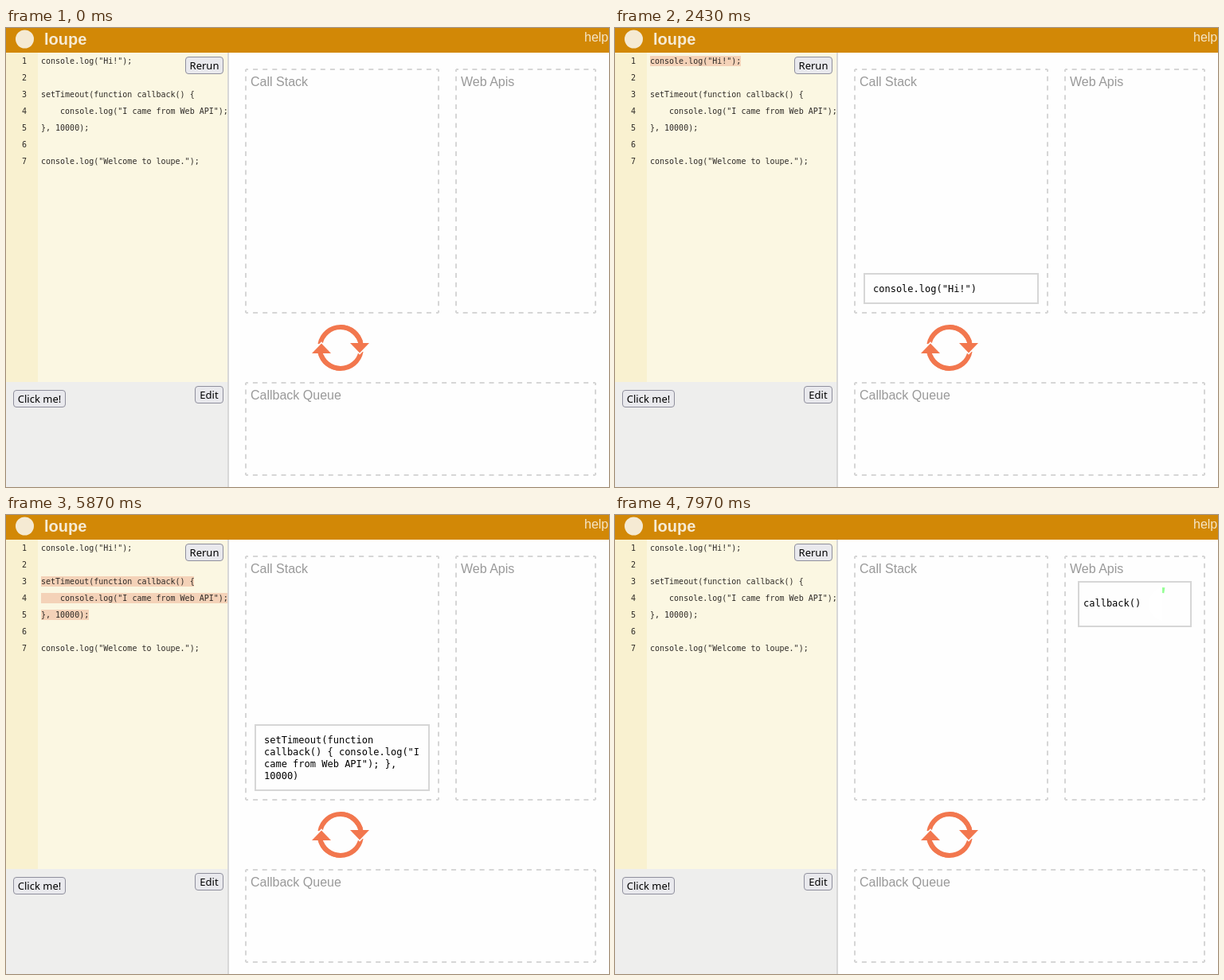
Animation, 757 px wide and 577 px high, one loop 8 s. Source, as an HTML page:

```html
<!DOCTYPE html>
<html lang="en">
<head>
<meta charset="utf-8">
<title>loupe</title>
<style>
  html, body { margin: 0; width: 100%; height: 100%; overflow: hidden; background: #fefefe; }
  svg { display: block; width: 757px; height: 577px; }
  text { white-space: pre; }
  .ui { font: 16px "Liberation Sans", Arial, sans-serif; }
  .label { fill: #999; }
  .code { font: 10px "DejaVu Sans Mono", monospace; fill: #2e2a26; }
  .call { font: 12px "DejaVu Sans Mono", monospace; fill: #000; }
  .button rect { fill: #e9e9ed; stroke: #8f8f9d; }
  .button text { font: 13px "Noto Sans", "Open Sans", sans-serif; text-anchor: middle; }
  .mark { fill: #f4d2b8; }
  .frame { fill: #fefefe; stroke: #d6d6d6; stroke-width: 2; }
  .dash { fill: none; stroke: #d6d6d6; stroke-width: 2; }
  .ring { fill: none; stroke: #f2774e; stroke-width: 6; }
  .arrow { fill: #f2774e; stroke: #fefefe; stroke-width: 3; paint-order: stroke; }
</style>
</head>
<body>
<svg id="stage" viewBox="0 0 757 577"></svg>
<script>
const LOOP = 8000;
const stage = document.getElementById('stage');

function add(parent, tag, attrs = {}, content) {
  const node = document.createElementNS('http://www.w3.org/2000/svg', tag);
  for (const key in attrs) node.setAttribute(key, attrs[key]);
  if (content !== undefined) node.textContent = content;
  parent.appendChild(node);
  return node;
}
const group = (parent = stage, attrs) => add(parent, 'g', attrs);
const rect = (parent, x, y, width, height, attrs) =>
  add(parent, 'rect', { x, y, width, height, ...attrs });
const text = (parent, x, y, content, cls, attrs) =>
  add(parent, 'text', { x, y, class: cls, ...attrs }, content);
const path = (parent, d, attrs) => add(parent, 'path', { d, ...attrs });

// Dashed outline with half a dash at the end of every side.
function dashedBox(x0, y0, x1, y1, label) {
  const [l, t, r, b] = [x0 + 1, y0 + 1, x1 - 1, y1 - 1];
  for (const [ax, ay, bx, by] of [[l, t, r, t], [r, t, r, b], [l, b, r, b], [l, t, l, b]]) {
    const length = bx - ax + by - ay;
    const pitch = length / Math.round(length / 12);
    add(stage, 'line', {
      x1: ax, y1: ay, x2: bx, y2: by, class: 'dash',
      'stroke-dasharray': `6 ${pitch - 6}`, 'stroke-dashoffset': 3
    });
  }
  text(stage, x0 + 7, y0 + 22, label, 'ui label');
}

function button(x, y, width, label) {
  const g = group(stage, { class: 'button' });
  const face = rect(g, x + .5, y + .5, width - 1, 21, { rx: 3.5 });
  text(g, x + width / 2, y + 16, label);
  return face;
}

function callBox(lines) {
  const height = 24 + 15 * lines.length;
  const g = group();
  rect(g, 313, 348 - height, 218, height - 2, { class: 'frame' });
  lines.forEach((line, i) => text(g, 324, 332 - 15 * (lines.length - 1 - i), line, 'call'));
  return g;
}

// Header
rect(stage, 0, 0, 757, 31, { fill: '#d28806' });
add(stage, 'circle', { cx: 23.5, cy: 14, r: 11.5, fill: '#f5ead3' });
text(stage, 48, 21, 'loupe', 'ui', { fill: '#f6ebd4', style: 'font-size:20px;font-weight:bold' });
text(stage, 726, 17, 'help', 'ui', { fill: '#f5e6c8' });

// Editor
const code = [
  'console.log("Hi!");',
  '',
  'setTimeout(function callback() {',
  '    console.log("I came from Web API");',
  '}, 10000);',
  '',
  'console.log("Welcome to loupe.");'
];
rect(stage, 0, 31, 278, 414, { fill: '#fbf7e2' });
rect(stage, 0, 31, 40, 414, { fill: '#f9f1d0' });
rect(stage, 0, 445, 278, 132, { fill: '#eeeeed' });
function highlight(rows) {
  const g = group();
  for (const row of rows) rect(g, 44, 35 + 21 * row, code[row].length * 6, 13, { class: 'mark' });
  return g;
}
const markHi = highlight([0]);
const markTimer = highlight([2, 3, 4]);
code.forEach((line, i) => {
  const y = 45 + 21 * i;
  text(stage, 20, y, i + 1, 'code');
  text(stage, 44, y, line, 'code');
});
rect(stage, 278, 31, 2, 546, { fill: '#d8d8d8' });

const rerun = button(225, 36, 48, 'Rerun');
button(237, 450, 36, 'Edit');
button(9, 455, 66, 'Click me!');

// Panels
dashedBox(300, 51, 544, 359, 'Call Stack');
dashedBox(564, 51, 741, 359, 'Web Apis');
dashedBox(300, 445, 741, 563, 'Callback Queue');

// Event loop symbol
path(stage, 'M394.4 397.5A26 26 0 0 1 445.6 397.5', { class: 'ring' });
path(stage, 'M445.6 406.5A26 26 0 0 1 394.4 406.5', { class: 'ring' });
path(stage, 'M432 396H456L444 408.5Z', { class: 'arrow' });
path(stage, 'M384 409H408L396 396.5Z', { class: 'arrow' });
path(stage, 'M420 376A26 26 0 0 1 445.6 397.5', { class: 'ring' });
path(stage, 'M420 428A26 26 0 0 1 394.4 408', { class: 'ring' });

// Calls on the stack
const callHi = callBox(['console.log("Hi!")']);
const callTimer = callBox([
  'setTimeout(function',
  'callback() { console.log("I',
  'came from Web API"); },',
  '10000)'
]);

// Pending timer
const timer = group();
const timerFace = rect(timer, 582, 84, 141, 56, { class: 'frame' });
text(timer, 588, 115, 'callback()', 'call');
path(timer, 'M687 91A21.5 21.5 0 0 0 687 133Z', { fill: '#fff' });
const hand = path(timer, 'M686 103L691 107L696 104.5L699 108L690 116L690 119L686 123Z', { fill: '#fff' });
const slice = path(timer, '', { fill: '#96ff96' });

const pointer = path(stage, 'M0 0V16L3.8 12.6L6.4 18.6L9 17.5L6.5 11.6H11.4Z',
  { fill: '#111', stroke: '#f4f4f4', 'stroke-width': 1, 'stroke-linejoin': 'round' });

// time, x, y, button face
const NORMAL = '#e9e9ed', HOVER = '#d0d0d7', PRESSED = '#adb0b5';
const moves = [
  [0, -50, -50, NORMAL],
  [600, 207, 67, NORMAL],
  [670, 224, 57, NORMAL],
  [730, 238, 51, HOVER],
  [800, 247, 55, HOVER],
  [900, 250, 70, NORMAL],
  [1100, 250, 64, NORMAL],
  [1170, 251, 57, HOVER],
  [1230, 252, 52, HOVER],
  [1300, 252, 49, HOVER],
  [1670, 252, 49, PRESSED],
  [1770, 252, 49, HOVER],
  [2300, 217, 27, NORMAL],
  [2370, 173, 6, NORMAL],
  [2430, -50, -50, NORMAL]
];

const ramp = (t, from, to) => Math.min(1, Math.max(0, (t - from) / (to - from)));
const show = (node, opacity) => node.setAttribute('opacity', opacity);
const within = (t, from, to) => +(t >= from && t < to);

function sector(angle) {
  const at = r => `${687 + r * Math.sin(angle)} ${112 - r * Math.cos(angle)}`;
  return `M687 98V91A21 21 0 0 1 ${at(21)}L${at(14)}Z`;
}

function draw(t) {
  const [, x, y, face] = moves.filter(m => m[0] <= t).pop();
  pointer.setAttribute('transform', `translate(${x} ${y})`);
  rerun.style.fill = face;

  show(markHi, within(t, 1700, 3730));
  show(markTimer, within(t, 5730, 7730));
  show(callHi, ramp(t, 1700, 1870) - ramp(t, 3700, 3870));
  show(callTimer, ramp(t, 5700, 5870) - ramp(t, 7710, 7870));

  show(timer, within(t, 7700, LOOP));
  const k = ramp(t, 7710, 7970);
  timerFace.style.fill = `rgb(254,254,${Math.round(190 + 64 * k)})`;
  show(hand, within(t, 7700, 7730));
  slice.setAttribute('d', sector(Math.max(0, t - 7710) / 10000 * 2 * Math.PI));
}

function tick() {
  draw(performance.now() % LOOP);
  requestAnimationFrame(tick);
}
tick();
</script>
</body>
</html>
```
